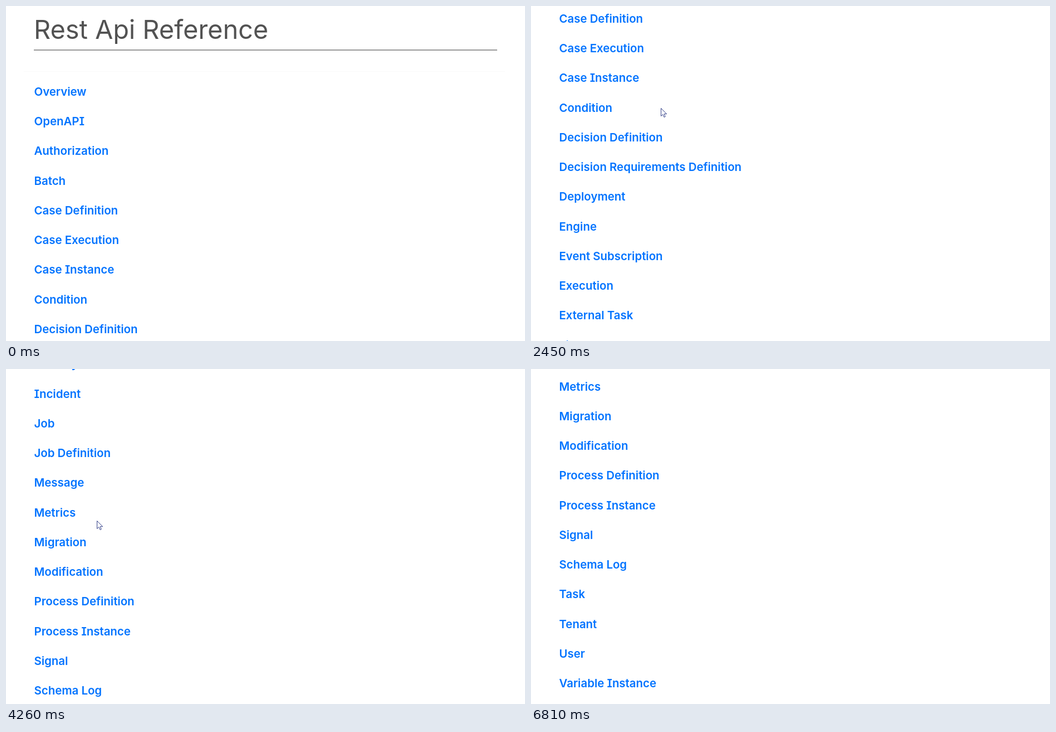
Recreate the animation shown at these times as an HTML page. Size 932 by 601 pixels, loop 7430 ms.

```html
<!DOCTYPE html>
<html lang="en">
<head>
<meta charset="utf-8">
<title>Rest Api Reference</title>
<style>
  html, body { margin: 0; width: 100%; height: 100%; overflow: hidden; background: #fff; }
  #stage {
    position: relative; width: 932px; height: 601px; overflow: hidden; background: #fff;
    font-family: Inter, "Open Sans", sans-serif; font-optical-sizing: none;
    font-feature-settings: "cv08";
  }
  #page { position: absolute; inset: 0; will-change: transform; }
  h1 {
    position: absolute; left: 50px; top: 12px; margin: 0;
    font-size: 46.8px; font-weight: 400; line-height: 60px; color: #525252; white-space: nowrap;
  }
  .rule { position: absolute; left: 50px; top: 78px; width: 832px; height: 2px; background: #999; }
  .edge { position: absolute; left: 32px; top: 117px; width: 864px; height: 1px; background: #fafafa; }
  #list { position: absolute; left: 50.5px; top: 126.9px; margin: 0; padding: 0; list-style: none; }
  #list li { height: 53.25px; line-height: 53.25px; }
  #list span { font-size: 20.4px; font-weight: 600; color: #0073ff; white-space: nowrap; }
  #cursor { position: absolute; left: 0; top: 0; overflow: visible; }
  #cursor path { fill: #fff; stroke: #35428a; stroke-width: 1; stroke-linejoin: round; }
</style>
</head>
<body>
<div id="stage">
  <div id="page">
    <h1>Rest Api Reference</h1>
    <div class="rule"></div>
    <div class="edge"></div>
    <ul id="list"></ul>
  </div>
  <svg id="cursor" width="18" height="22">
    <path id="arrow" d="M.5 .5V14.5L3.8 11.5L6 16.5L8.2 15.5L6.1 10.7H10.6Z"/>
    <path id="hand" transform="translate(-7.5 0)" d="M6 12V2a1.5 1.5 0 0 1 3 0V8V6.5a1.3 1.3 0 0 1 2.6 0V8.5V7.2a1.2 1.2 0 0 1 2.4 0V9V8.2a1 1 0 0 1 2 0V14q0 5.5-5 5.5H9q-2.5 0-4-2.5L1 12q-.8-1.5.6-2.2t2.6 1L6 12.5Z"/>
  </svg>
</div>
<script>
const LOOP = 7430, STEP = 75, SLACK = 15, ROW = 53.25, FIRST_ROW = 153.5;

const topics = ["Overview", "OpenAPI", "Authorization", "Batch", "Case Definition", "Case Execution",
  "Case Instance", "Condition", "Decision Definition", "Decision Requirements Definition",
  "Deployment", "Engine", "Event Subscription", "Execution", "External Task", "Filter", "Group",
  "History", "Identity", "Incident", "Job", "Job Definition", "Message", "Metrics", "Migration",
  "Modification", "Process Definition", "Process Instance", "Signal", "Schema Log", "Task",
  "Tenant", "User", "Variable Instance"];

// The picture only advances inside these spans, in even steps
const spans = [[70, 140], [380, 1120], [1300, 1990], [2300, 6040], [6140, 6810]];

function stepAt(t) {
  return spans.filter(([from]) => t >= from).reduce((sum, [from, to]) =>
    sum + 1 + Math.floor((Math.min(t, to) - from + SLACK) / STEP), 0);
}

const poses = [
  { t: 0,    x: 889, y: 676, scroll: 0 },
  { t: 140,  x: 769, y: 496, scroll: 0 },
  { t: 1120, x: 216, y: 173, scroll: 0 },
  { t: 1690, x: 226, y: 179, scroll: 131 },
  { t: 2450, x: 233, y: 183, scroll: 344 },
  { t: 3570, x: 180, y: 253, scroll: 847 },
  { t: 4260, x: 163, y: 272, scroll: 1121 },
  { t: 5200, x: 128, y: 288, scroll: 1296 },
  { t: 6040, x: 183, y: 430, scroll: 1347 },
  { t: 6810, x: 900, y: 612, scroll: 1347 }
].map(pose => ({ ...pose, step: stepAt(pose.t) }));

// Monotone cubic through the poses, so nothing overshoots
function curve(prop) {
  const slope = i => (poses[i + 1][prop] - poses[i][prop]) / (poses[i + 1].step - poses[i].step);
  const last = poses.length - 1;
  const tangent = i => {
    if (i === 0) return slope(0);
    if (i === last) return slope(last - 1);
    const a = slope(i - 1), b = slope(i);
    return a * b > 0 ? 2 * a * b / (a + b) : 0;
  };
  return step => {
    const next = poses.findIndex(pose => pose.step > step);
    if (next < 0) return poses[last][prop];
    const i = next - 1, a = poses[i], b = poses[next];
    const w = b.step - a.step, p = (step - a.step) / w, q = 1 - p;
    return Math.round(a[prop] * (1 + 2 * p) * q * q + b[prop] * (3 - 2 * p) * p * p
      + w * p * q * (tangent(i) * q - tangent(next) * p));
  };
}

const xAt = curve("x"), yAt = curve("y"), scrollAt = curve("scroll");

const $ = id => document.getElementById(id);
const page = $("page"), cursor = $("cursor"), arrow = $("arrow"), hand = $("hand");

const links = topics.map(name => {
  const row = document.createElement("li");
  const link = row.appendChild(document.createElement("span"));
  link.textContent = name;
  $("list").append(row);
  return link;
});

function overLink(x, y) {
  const row = Math.round((y - FIRST_ROW) / ROW);
  const link = links[row];
  return !!link && Math.abs(y - FIRST_ROW - row * ROW) < 13 && x >= 50 && x < 50 + link.offsetWidth;
}

function draw(t) {
  const step = stepAt(t);
  const x = xAt(step), y = yAt(step), scroll = scrollAt(step);
  const pointing = overLink(x, y + scroll);
  page.style.transform = `translateY(${-scroll}px)`;
  cursor.style.transform = `translate(${x}px, ${y}px)`;
  arrow.style.display = pointing ? "none" : "";
  hand.style.display = pointing ? "" : "none";
}

const start = performance.now();
function loop() {
  draw((performance.now() - start) % LOOP);
  requestAnimationFrame(loop);
}
loop();
</script>
</body>
</html>
```
